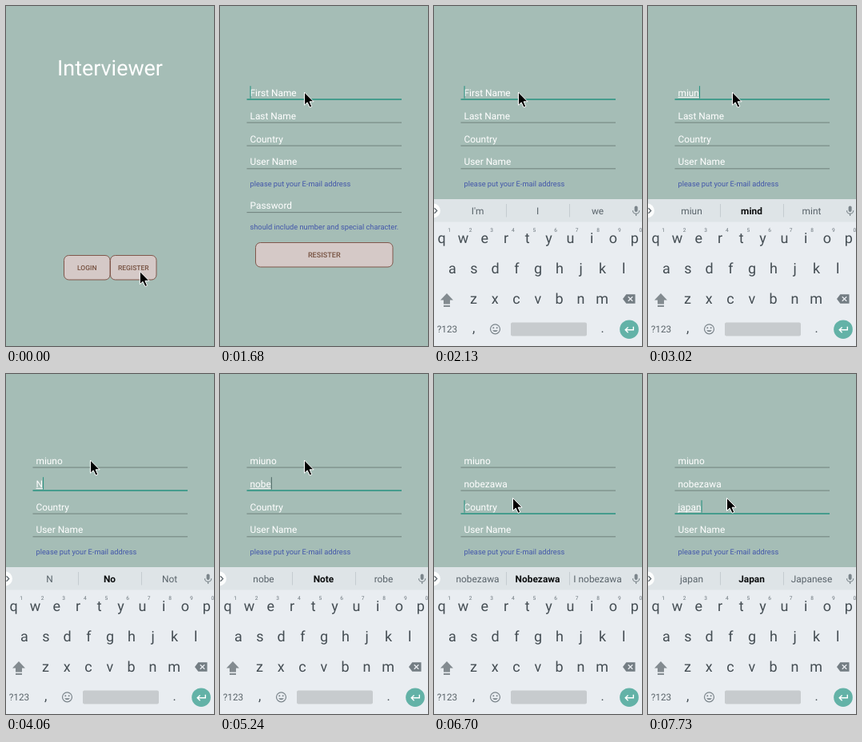
These frames come from a looping animation (260 px wide and 426 px high, 8000 ms). An HTML page:

```html
<!DOCTYPE html>
<html lang="en">
<head>
<meta charset="utf-8">
<title>Sign-up form</title>
<style>
  html, body { margin: 0; width: 100%; height: 100%; overflow: hidden; background: #a5bdb6; }
  svg { display: block; width: 260px; height: 426px; }
  text { font-family: Roboto, sans-serif; text-rendering: geometricPrecision; white-space: pre; }
</style>
</head>
<body>
<svg id="stage" viewBox="0 0 260 426" width="260" height="426">
  <rect width="260" height="426" fill="#a5bdb6"/>
  <g id="home"></g>
  <g id="form"></g>
  <g id="keys"></g>
  <path id="mouse" d="M0 0V16.2L3.7 12.8 6.6 19 9.3 17.9 6.6 11.8H11.6Z"
        fill="#000" stroke="#fff" stroke-width="1" stroke-linejoin="round"/>
</svg>
<script>
const LOOP = 8000;
const $ = id => document.getElementById(id);

function add(parent, tag, attrs, content) {
  const el = document.createElementNS('http://www.w3.org/2000/svg', tag);
  for (const k in attrs) el.setAttribute(k, attrs[k]);
  if (content !== undefined) el.textContent = content;
  parent.appendChild(el);
  return el;
}
const set = (el, attrs) => { for (const k in attrs) el.setAttribute(k, attrs[k]); };
const label = (parent, x, y, size, fill, str, more) =>
  add(parent, 'text', { x, y, 'font-size': size, fill, ...more }, str);
const mid = { 'text-anchor': 'middle' };

function button(parent, x, y, w, h, size, str) {
  add(parent, 'rect', { x, y, width: w, height: h, rx: 6, fill: '#d5c9c7', stroke: '#80574b' });
  label(parent, x + w / 2, y + h / 2 + 3.2, size, '#75503f', str, { ...mid, 'font-weight': 500 });
}

// Start screen
const home = $('home');
label(home, 130, 87.3, 26.9, '#fff', 'Interviewer', mid);
button(home, 72.5, 312.5, 57.5, 30.5, 8.5, 'LOGIN');
button(home, 130.5, 312.5, 57.5, 30.5, 8.5, 'REGISTER');

// Form
const form = $('form');
const LEFT = 37.5;
const fields = [['First Name', 112.6], ['Last Name', 141.6], ['Country', 170.6],
  ['User Name', 199.4], ['Password', 254.2]].map(([hint, y]) => ({
  hint, y,
  line: add(form, 'rect', { x: 33.5, width: 193.5 }),
  text: label(form, LEFT, y, 11.9, '#fff', hint)
}));
label(form, LEFT, 225.6, 9.25, '#4357aa', 'please put your E-mail address');
label(form, LEFT, 280.2, 9.25, '#4357aa', 'should include number and special character.');
button(form, 44.5, 296.5, 171.5, 30.5, 9.1, 'RESISTER');
const under = add(form, 'rect', { height: 0.9, fill: '#fff' });
const caret = add(form, 'rect', { width: 1.1, height: 15.5 });

// Keyboard
const keys = $('keys');
const INK = '#444d53', SOFT = '#7b858b';
add(keys, 'rect', { y: 242, width: 260, height: 184, fill: '#e9edf1' });
add(keys, 'rect', { y: 242, width: 260, height: 28.5, fill: '#dee4e7' });
add(keys, 'circle', { cx: -1, cy: 256.5, r: 9, fill: '#fcfdfd' });
add(keys, 'path', { d: 'M0.5 253.3L3.7 256.5 0.5 259.7', fill: 'none', stroke: '#5c666c', 'stroke-width': 1.3 });
for (const x of [90, 169]) add(keys, 'rect', { x, y: 248, width: 1, height: 16.5, fill: '#c5ccd0' });
const words = [54.5, 129.5, 204.5].map(x => label(keys, x, 261, 11.9, '#59636a', '', mid));

add(keys, 'rect', { x: 250.6, y: 250.5, width: 4, height: 7.6, rx: 2, fill: SOFT });
add(keys, 'path', { d: 'M248.5 256.3a4.1 4.1 0 0 0 8.2 0M252.6 260.4V263', fill: 'none', stroke: SOFT, 'stroke-width': 1.2 });

[['qwertyuiop', 9.7, 297.4], ['asdfghjkl', 23, 335.2], ['zxcvbnm', 49.5, 373.2]].forEach(([row, x, y]) =>
  [...row].forEach((c, i) => label(keys, x + i * 26.78, y, 18, INK, c, mid)));
[...'1234567890'].forEach((c, i) => label(keys, 19 + i * 26.6, 282.6, 6.6, '#69737a', c, mid));

add(keys, 'path', { d: 'M16 360L24 368.6H20V373.4H12V368.6H8ZM12 375H20V377H12Z', fill: '#838b90' });
add(keys, 'path', { d: 'M236 367L240.3 361.2H251.5V372.8H240.3Z', fill: '#737d83' });
add(keys, 'path', { d: 'M242.7 364.2L248.3 369.8M248.3 364.2L242.7 369.8', stroke: '#e9edf1', 'stroke-width': 1.3 });

label(keys, 16.5, 409.2, 11.8, '#5a646a', '?123', mid);
label(keys, 49.7, 409, 17, INK, ',', mid);
label(keys, 210.7, 409.4, 16, INK, '.', mid);
add(keys, 'circle', { cx: 76.5, cy: 404.8, r: 6, fill: 'none', stroke: SOFT, 'stroke-width': 1.2 });
for (const cx of [74.3, 78.7]) add(keys, 'circle', { cx, cy: 403.2, r: 1, fill: SOFT });
add(keys, 'path', { d: 'M73.2 406.2a3.5 3.2 0 0 0 6.6 0Z', fill: SOFT });
add(keys, 'rect', { x: 96, y: 396.5, width: 95, height: 17, rx: 2, fill: '#c7cbce' });
add(keys, 'circle', { cx: 244, cy: 405.2, r: 11.8, fill: '#63b2a7' });
add(keys, 'path', { d: 'M249.3 401.8V405.8H239.6M242.6 402.4L239.2 405.8 242.6 409.2',
  fill: 'none', stroke: '#fff', 'stroke-width': 1.4 });

// Timeline: each step changes part of the state and holds until the next
const steps = [];
const at = (t, change) => steps.push([t, change]);
const type = (t0, gap, i, list) => list.forEach(([str, guess, other, bold], n) =>
  at(t0 + n * gap, { ['v' + i]: str, sugg: [str, guess, other], bold: bold !== 0, compose: true, caret: 1 }));
const idle = { sugg: ["I'm", 'I', 'we'], bold: false };

at(0, { fade: 0, rise: 200, mouse: [167.3, 332.5], focus: -1, caret: 0, compose: false, v0: '', v1: '', v2: '', ...idle });
at(500, { fade: 0.5 });
at(640, { fade: 1 });
at(1090, { mouse: [128, 194] });
at(1230, { mouse: [105.5, 108] });
at(1680, { focus: 0, caret: 1 });
at(1980, { rise: 70 });
at(2130, { rise: 0 });
at(2280, { caret: 0 });
type(2570, 150, 0, [['m', 'my', 'me', 0], ['mi', 'mix', 'mine'], ['miu', 'mix', 'mid'],
  ['miun', 'mind', 'mint'], ['miuno', 'Miuno', 'minor']]);
at(3460, { focus: 1, compose: false });
at(3610, idle);
type(4060, 0, 1, [['N', 'No', 'Not']]);
at(4510, { v1: '', compose: false, ...idle });
type(4660, 145, 1, [['n', 'no', 'not'], ['no', 'not', 'now'], ['nob', 'not', 'job']]);
at(5090, { caret: 0 });
type(5240, 145, 1, [['nobe', 'Note', 'robe']]);
at(5240, { caret: 2 });
type(5380, 148, 1, [['nobez', 'noted', 'Nobel'.slice(0, 4) + 'y'], ['nobeza', 'nobody', 'nobles'],
  ['nobezaw', 'nobody', 'nobezaw'], ['nobezawa', 'Nobezawa', 'I nobezawa']]);
at(6120, { caret: 0 });
at(6270, { mouse: [103.5, 121] });
at(6410, { mouse: [100, 143] });
at(6550, { mouse: [98.5, 155.3] });
at(6700, { focus: 2, caret: 1, compose: false });
at(6840, idle);
type(7290, 146, 2, [['j', 'just', 'John'.slice(0, 2) + 'b'], ['ja', 'Jan', 'jam'],
  ['japa', 'Japan', 'Japanese'], ['japan', 'Japan', 'Japanese']]);

function draw(t) {
  const s = {};
  for (const [start, change] of steps) if (t >= start) Object.assign(s, change);

  set(home, { opacity: 1 - s.fade });
  set(form, { opacity: s.fade });
  set(keys, { transform: `translate(0 ${s.rise})` });
  set($('mouse'), { transform: `translate(${s.mouse})` });

  fields.forEach((f, i) => {
    const on = i === s.focus;
    f.text.textContent = s['v' + i] || f.hint;
    set(f.line, { y: f.y + (on ? 3.6 : 4), height: on ? 1.6 : 0.9, fill: on ? '#2f9483' : '#6a7a76' });
  });

  const f = fields[Math.max(s.focus, 0)];
  const w = s['v' + s.focus] ? f.text.getComputedTextLength() : 0;
  set(under, { x: LEFT, y: f.y + 1.3, width: s.compose ? w : 0 });
  set(caret, { x: LEFT + w, y: f.y - 12.4, opacity: s.caret ? 1 : 0, fill: s.caret === 2 ? '#56706d' : '#2f9483' });

  words.forEach((el, i) => {
    const strong = i === 1 && s.bold;
    el.textContent = s.sugg[i];
    set(el, { 'font-weight': strong ? 700 : 400, fill: strong ? '#0b0d0e' : '#59636a' });
  });
}

const begin = performance.now();
function tick() {
  draw((performance.now() - begin) % LOOP);
  requestAnimationFrame(tick);
}
tick();
</script>
</body>
</html>
```
